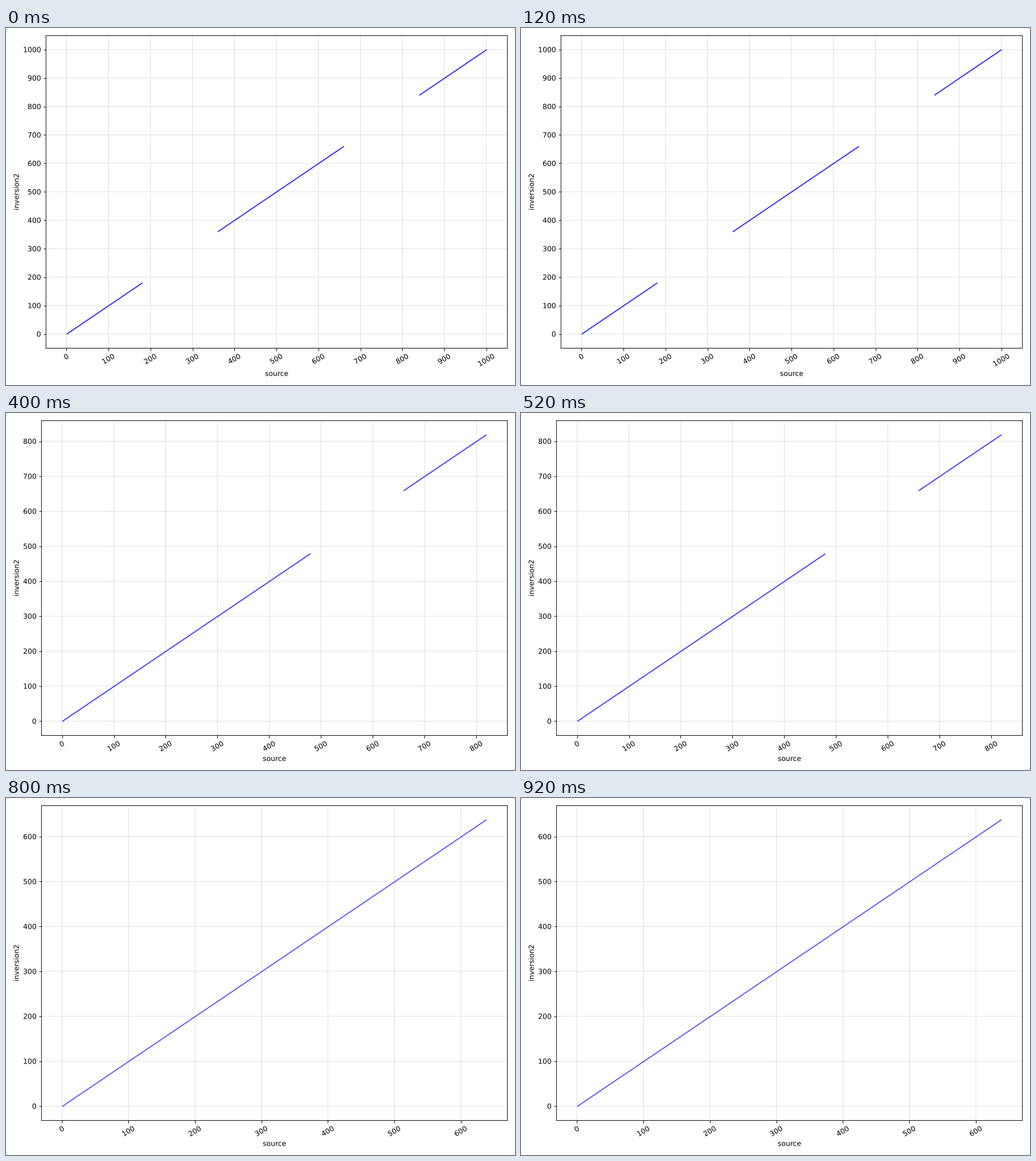
A matplotlib script that plays this animation: 894x626 px, repeating every 1 s.

```python
import matplotlib.pyplot as plt
import numpy as np
from matplotlib.animation import FuncAnimation
from matplotlib.patheffects import Normal
from matplotlib.ticker import MultipleLocator

WIDTH, HEIGHT, DPI = 894, 626, 89.4
MARGIN = 0.05
BLOCK_STARTS = (180, 660)
BLOCK_LENGTH = 180

# Draw text and ticks as plain outlines at sub-pixel positions.
plt.rcParams.update({
    "path.snap": False,
    "path.effects": [Normal()],
    "text.hinting": "none",
})

bases = np.arange(1, 1001)
fig, ax = plt.subplots(
    figsize=((WIDTH + 1e-6) / DPI, (HEIGHT + 1e-6) / DPI), dpi=DPI
)


def kept_after(cuts):
    """Mask of the bases left once the first `cuts` blocks are removed."""
    kept = np.ones(bases.size, bool)
    for start in BLOCK_STARTS[:cuts]:
        kept &= (bases < start) | (bases > start + BLOCK_LENGTH)
    return kept


def match_points(stage):
    """Blocks leave the y sequence first, then the x sequence."""
    kept_x = kept_after(stage // 2)
    kept_y = kept_after((stage + 1) // 2)
    shown = kept_x & kept_y
    for start in BLOCK_STARTS:  # inverted blocks never match
        shown &= (bases <= start) | (bases > start + BLOCK_LENGTH)
    return np.cumsum(kept_x)[shown], np.cumsum(kept_y)[shown] - 1


def padded(values):
    low, high = values.min(), values.max()
    pad = MARGIN * (high - low)
    return low - pad, high + pad


def draw(stage):
    ax.clear()
    x, y = match_points(stage)
    ax.scatter(x, y, s=2.25, color="blue", alpha=0.7, edgecolors="none", zorder=2)
    ax.set(xlim=padded(x), ylim=padded(y), xlabel="source", ylabel="inversion2")
    for axis in (ax.xaxis, ax.yaxis):
        axis.set_major_locator(MultipleLocator(100))
    ax.tick_params(axis="x", rotation=30)
    ax.grid(True, alpha=0.4)
    fig.tight_layout()


anim = FuncAnimation(
    fig, draw, frames=2 * len(BLOCK_STARTS) + 1, init_func=lambda: None,
    interval=200, repeat=True, repeat_delay=0, blit=False,
)
plt.show()
```
